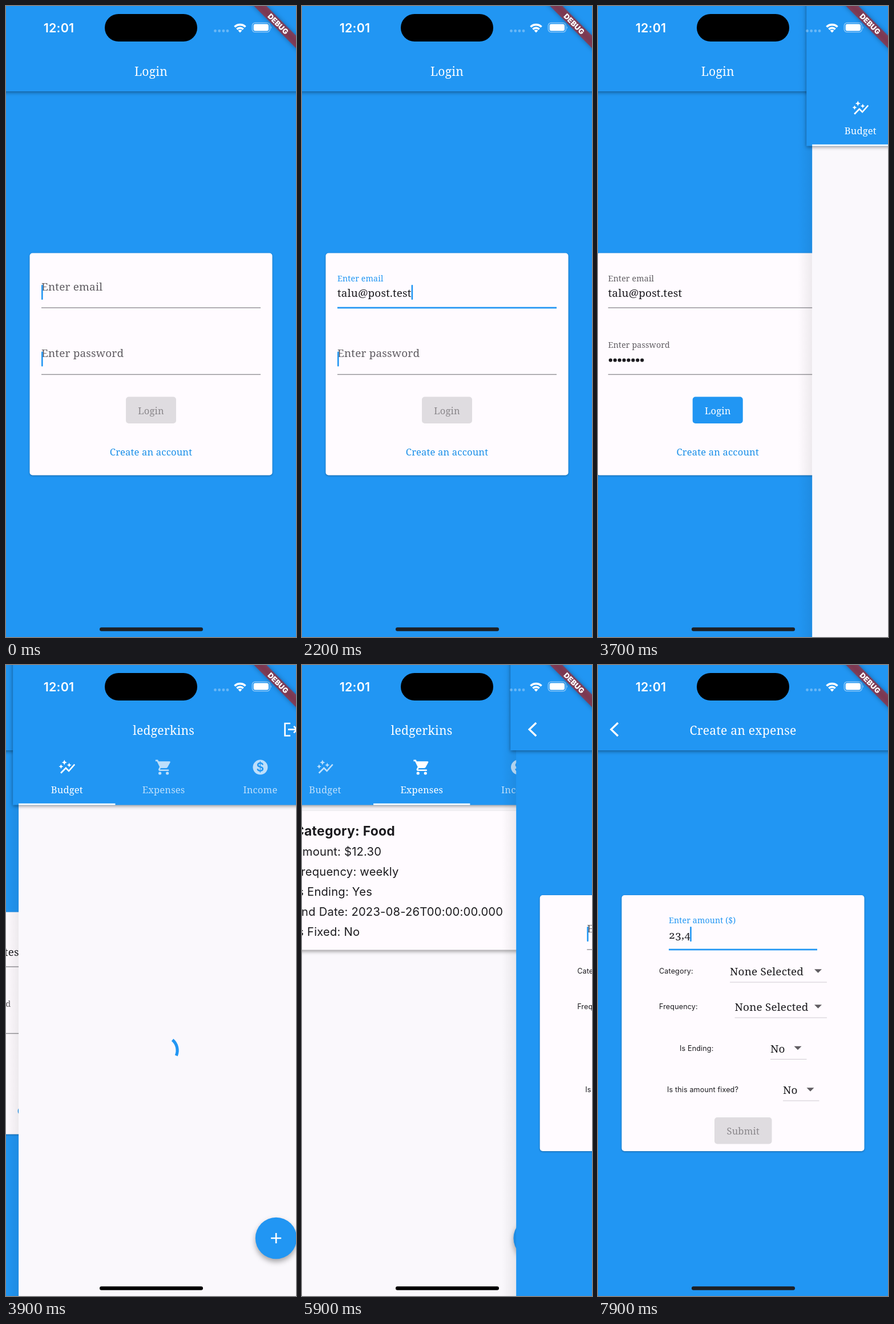
An HTML page for the animation above (8 s loop, 508 by 1102 pixels).

```html
<!DOCTYPE html>
<html lang="en">
<head>
<meta charset="utf-8">
<title>Budget app walkthrough</title>
<style>
  html, body { margin: 0; width: 100%; height: 100%; overflow: hidden; background: #2196f3; }
  svg { display: block; width: 508px; height: 1102px; }
  text { white-space: pre; }
  .serif { font-family: "Noto Serif", serif; font-variant-numeric: oldstyle-nums; letter-spacing: .01em; }
  .sans { font-family: Inter, sans-serif; letter-spacing: .01em; }
  .bar { filter: drop-shadow(0 2px 3px rgba(0,0,0,.4)); }
  .card { filter: drop-shadow(0 1.5px 1.5px rgba(0,0,0,.32)); }
  .raised { filter: drop-shadow(0 3px 3px rgba(0,0,0,.36)); }
  .fab { filter: drop-shadow(0 5px 5px rgba(0,0,0,.34)); }
  .banner { filter: drop-shadow(0 0 4px rgba(0,0,0,.5)); }
</style>
</head>
<body>
<svg viewBox="0 0 508 1102">
  <defs>
    <linearGradient id="edge" x1="1" x2="0">
      <stop offset="0" stop-opacity=".07"/><stop offset="1" stop-opacity="0"/>
    </linearGradient>
  </defs>
  <g id="stage"></g>
  <g id="system">
    <text class="sans" x="92.5" y="46" font-size="21.5" font-weight="600" fill="#fff" text-anchor="middle">12:01</text>
    <rect x="173" y="14" width="162" height="48" rx="24"/>
    <g fill="#fff" fill-opacity=".32">
      <circle cx="366.5" cy="43.5" r="2.4"/><circle cx="373.7" cy="43.5" r="2.4"/>
      <circle cx="380.9" cy="43.5" r="2.4"/><circle cx="388" cy="43.5" r="2.4"/>
    </g>
    <g fill="none" stroke="#fff" stroke-width="3.6">
      <path d="M400.5 36.5a13.5 13.5 0 0 1 19 0M404.4 40.6a8 8 0 0 1 11.2 0"/>
      <path d="M410 46.5l-3.4-3.6a4.8 4.8 0 0 1 6.8 0z" fill="#fff" stroke="none"/>
    </g>
    <rect x="431.3" y="29.3" width="31" height="16.4" rx="5" fill="none" stroke="#fff" stroke-opacity=".5" stroke-width="1.3"/>
    <rect x="433.6" y="31.6" width="26.4" height="11.8" rx="3.2" fill="#fff"/>
    <path d="M464 35q2 2.5 0 5z" fill="#fff" fill-opacity=".6"/>
    <rect id="home" x="164" y="1085.3" width="181" height="6.4" rx="3.2"/>
    <g transform="translate(508 0) rotate(45)">
      <rect class="banner" x="-60" y="36.5" width="120" height="15.6" fill="#b71c1c" fill-opacity=".627"/>
      <text class="sans" y="49" font-size="12.8" font-weight="900" fill="#fff" text-anchor="middle">DEBUG</text>
    </g>
  </g>
</svg>
<script>
const W = 508, H = 1102, LOOP = 8000, STEP = 100;
const BLUE = '#2196f3', PAPER = '#fffbff', INK = '#1c1b1f', GRAY = '#605d62', LINE = '#918f94', RED = '#ba1a1a';
const SERIF_SCALE = 0.91;
const EMAIL = 'talu@post.test';

const stage = document.getElementById('stage');
const home = document.getElementById('home');
const ruler = document.createElement('canvas').getContext('2d');

const clamp = v => Math.min(1, Math.max(0, v));
const lerp = (a, b, p) => a + (b - a) * p;
const progress = (t, start, length) => clamp((t - start) / length);
const mix = (a, b, p) => `color-mix(in srgb, ${b} ${p * 100}%, ${a})`;
const typedCount = (t, start, step) => Math.max(0, Math.floor((t - start) / step) + 1);

function bezier(x1, y1, x2, y2) {
  const at = (a, b, s) => 3 * (1 - s) ** 2 * s * a + 3 * (1 - s) * s * s * b + s ** 3;
  return x => {
    let lo = 0, hi = 1;
    for (let i = 0; i < 24; i++) {
      const mid = (lo + hi) / 2;
      if (at(x1, x2, mid) < x) lo = mid; else hi = mid;
    }
    return x >= 1 ? 1 : at(y1, y2, hi);
  };
}
const ease = bezier(.25, .1, .25, 1);
const fastOutSlowIn = bezier(.4, 0, .2, 1);
const pageCurve = bezier(.35, .91, .33, .97);

// Drawing helpers
const rect = (x, y, w, h, fill, extra = '') =>
  `<rect x="${x}" y="${y}" width="${w}" height="${h}" style="fill:${fill}" ${extra}/>`;
const group = (x, content, extra = '') => `<g transform="translate(${x} 0)" ${extra}>${content}</g>`;
const serif = (x, y, size, str, fill = INK, anchor = 'start') =>
  `<text class="serif" x="${x}" y="${y}" font-size="${size * SERIF_SCALE}" text-anchor="${anchor}" style="fill:${fill}">${str}</text>`;
const sans = (x, y, size, str, weight = 400) =>
  `<text class="sans" x="${x}" y="${y}" font-size="${size}" font-weight="${weight}" fill="${INK}">${str}</text>`;
const card = (x, y, w, h, cls = 'card') => rect(x, y, w, h, PAPER, `rx="5" class="${cls}"`);

function serifWidth(str, size) {
  const px = size * SERIF_SCALE;
  ruler.font = `${px}px "Noto Serif", serif`;
  return ruler.measureText(str).width + str.length * px * .01;
}

function button(x, y, w, str, enabled) {
  return rect(x, y, w, 46.5, enabled ? BLUE : '#dfdce0', 'rx="5"') +
    serif(x + w / 2, y + 30, 18.2, str, enabled ? '#fff' : '#8a878b', 'middle');
}

const titleBar = (str, height = 149) =>
  rect(-10, -10, W + 20, height + 10, BLUE, 'class="bar"') + serif(254, 122, 23.2, str, '#fff', 'middle');

// A Material text field; y is its underline.
function field({ x, y, w, label, value = '', dots = 0, float, focus, error = 0 }) {
  const accent = error ? RED : BLUE;
  const lit = error ? 1 : focus;
  const tint = mix(GRAY, accent, lit);
  const thick = lerp(1.4, 2.7, focus);
  let out = rect(x, y - thick / 2, w, thick, mix(LINE, accent, lit)) +
    serif(x, lerp(y - 30.5, y - 46.5, float), lerp(20.8, 15.6, float), label, tint);
  if (value) out += serif(x, y - 19, 20.8, value);
  for (let i = 0; i < dots; i++) out += `<circle cx="${x + 4.2 + i * 7.9}" cy="${y - 25}" r="3.1" fill="${INK}"/>`;
  if (focus > 0) {
    const end = dots ? dots * 7.9 : value ? serifWidth(value, 20.8) : 0;
    out += rect(x + end, y - 40, 2.6, 26, accent, 'rx="1"');
  }
  return out;
}

const errorText = (x, y, str, opacity) => `<g opacity="${opacity}">${serif(x, y, 15.6, str, RED)}</g>`;

// Pages
function loginPage(t) {
  const typed = t < 1400 ? Math.min(4, typedCount(t, 700, 150)) : 4 + typedCount(t, 1400, 60);
  const count = Math.min(EMAIL.length, typed);
  const dots = Math.min(8, typedCount(t, 2500, 120));
  const emailError = count > 0 && count < EMAIL.length - 1;
  const passError = dots > 0 && dots < 8;
  const emailFloat = fastOutSlowIn(progress(t, 420, 167));
  const passFloat = fastOutSlowIn(progress(t, 2250, 167));
  const passFocus = t < 3500 ? passFloat : 0;
  const growth = emailError || passError ? 28 : 0;
  const top = 431.5 - growth / 2;
  const passTop = top + (emailError ? 28 : 0);

  return rect(0, 0, W, H, BLUE) + titleBar('Login') + card(41.5, top, 425, 388 + growth) +
    field({ x: 62, y: top + 95.5, w: 384, label: 'Enter email', value: EMAIL.slice(0, count),
      float: emailFloat, focus: t < 2250 ? emailFloat : 0, error: emailError }) +
    (emailError ? errorText(62, top + 120.5, 'invalid username', progress(t, 680, 167)) : '') +
    field({ x: 62, y: passTop + 212, w: 384, label: 'Enter password', dots,
      float: passFloat, focus: passFocus, error: passError }) +
    (passError ? errorText(62, top + 237, 'invalid password', progress(t, 2480, 167)) : '') +
    button(210, top + growth + 251, 88, 'Login', dots >= 8) +
    serif(254, top + growth + 353.5, 18.2, 'Create an account', '#1a8fe8', 'middle');
}

function spinner(cx, cy, ms) {
  const phase = ms / 1333 % 1;
  const head = fastOutSlowIn(clamp(phase * 2)) * 1.5 * Math.PI;
  const tail = fastOutSlowIn(clamp(phase * 2 - 1)) * 1.5 * Math.PI;
  const start = -Math.PI / 2 + tail + ms / 2222 * 2 * Math.PI + phase * Math.PI / 2;
  const sweep = Math.max(head - tail, .001);
  const point = a => `${cx + 24 * Math.cos(a)} ${cy + 24 * Math.sin(a)}`;
  return `<path d="M${point(start)}A24 24 0 ${+(sweep > Math.PI)} 1 ${point(start + sweep)}" fill="none" stroke="${BLUE}" stroke-width="5.2"/>`;
}

const icons = [
  `<path d="M14.06 9.94L12 9l2.06-.94L15 6l.94 2.06L18 9l-2.06.94L15 12zM4 14l.94-2.06L7 11l-2.06-.94L4 8l-.94 2.06L1 11l2.06.94zM8.5 9l1.09-2.41L12 5.5 9.59 4.41 8.5 2 7.41 4.41 5 5.5l2.41 1.09zM4.5 20.5l6-6.01 4 4L23 8.93l-1.41-1.41-7.09 7.97-4-4L3 19z"/>`,
  `<circle cx="7" cy="20" r="2"/><circle cx="17" cy="20" r="2"/><path d="M1 2v2h2l3.6 7.59-1.35 2.45C4.5 15.4 5.5 17 7 17h12v-2H7.42c-.2 0-.3-.2-.22-.37l.9-1.63h7.45c.75 0 1.41-.41 1.75-1.03l3.58-6.49C21.2 4.8 20.8 4 20 4H5.21l-.94-2z"/>`,
  `<circle cx="12" cy="12" r="10"/><text class="sans" x="12" y="17.6" font-size="16" font-weight="600" text-anchor="middle" fill="${BLUE}">$</text>`
];

function tab(i, str, active) {
  const cx = W / 6 * (2 * i + 1);
  return `<g fill="#fff" opacity="${lerp(.7, 1, active)}">
    <g transform="translate(${cx - 15.6} 163) scale(1.3)">${icons[i]}</g>
    ${serif(cx, 224, 18.2, str, '#fff', 'middle')}</g>`;
}

function dashboardPage(t) {
  const slide = ease(progress(t, 4850, 300));
  const ink = progress(t, 4740, 80) * (1 - progress(t, 5020, 200));
  const lines = ['Amount: $12.30', 'Frequency: weekly', 'Is Ending: Yes',
    'End Date: 2023-08-26T00:00:00.000', 'Is Fixed: No'];
  const expense = card(10, 255, 488, 242.5, 'raised') + sans(31, 298, 23, 'Category: Food', 700) +
    lines.map((str, i) => sans(31, 332.5 + i * 35, 20.2, str)).join('');

  return rect(0, 0, W, H, '#faf8fc') +
    group(-W * slide, (t < 4500 ? spinner(254, 673, t - 3725) : '') + group(W, expense)) +
    titleBar('ledgerkins', 244.5) +
    '<path d="M476 102H466.5V123.500H476M472 112.700H487M482 107l5.700 5.700-5.700 5.700" fill="none" stroke="#fff" stroke-width="2.7"/>' +
    rect(W / 3, 149, W / 3, 95.5, `rgba(120,160,200,${.24 * ink})`) +
    tab(0, 'Budget', 1 - slide) + tab(1, 'Expenses', slide) + tab(2, 'Income', 0) +
    rect(W / 3 * slide, 241.800, W / 3, 2.7, '#fff') +
    `<circle class="fab" cx="451" cy="1001" r="36.300" fill="${BLUE}"/>` +
    '<path d="M442 1001h18M451 992v18" stroke="#fff" stroke-width="2.6"/>';
}

// One labelled dropdown; y is the middle of the row.
function dropdown(labelX, label, x, right, y, value) {
  const arrow = right - 15.5;
  return sans(labelX, y + 4.5, 12.6, label) + serif(x, y + 7.500, 20.8, value) +
    `<path d="M${arrow - 6.500} ${y - 3.200}h13l-6.500 6.500z" fill="#605d62"/>` +
    rect(x, y + 19, right - x, 1, '#cfccd1');
}

function expensePage(t) {
  const focus = fastOutSlowIn(progress(t, 6490, 167));
  const value = '23,4'.slice(0, typedCount(t, 6900, 250));
  return rect(0, 0, W, H, BLUE) + titleBar('Create an expense') +
    '<path d="M35 101L23 112.500 35 124" fill="none" stroke="#fff" stroke-width="3.300"/>' +
    card(41.5, 402, 425, 447) +
    field({ x: 124, y: 497, w: 260, label: 'Enter amount ($)', value, float: focus, focus }) +
    dropdown(107, 'Category:', 231, 401, 534.5, 'None Selected') +
    dropdown(107, 'Frequency:', 239.5, 401, 596.5, 'None Selected') +
    dropdown(143, 'Is Ending:', 302, 365.5, 669, 'No') +
    dropdown(121, 'Is this amount fixed?', 324, 387.5, 741.5, 'No') +
    button(204, 790, 100.5, 'Submit', false);
}

// The new page slides in while the old one recedes by a third.
function push(oldPage, newPage, p) {
  const x = W * (1 - p);
  return group(-W / 3 * p, oldPage) +
    (p < 1 ? rect(x - 25, 0, 25, H, 'url(#edge)') : '') + group(x, newPage);
}

function render(t) {
  const toDashboard = pageCurve(progress(t, 3660, 400));
  const toExpense = pageCurve(progress(t, 5860, 400));
  if (t <= 3660) stage.innerHTML = loginPage(t);
  else if (t <= 5860) stage.innerHTML = push(toDashboard < 1 ? loginPage(t) : '', dashboardPage(t), toDashboard);
  else stage.innerHTML = push(toExpense < 1 ? dashboardPage(t) : '', expensePage(t), toExpense);
  home.setAttribute('fill', toDashboard > .5 && toExpense < .5 ? '#000' : '#1c1f24');
}

const begin = performance.now();
function tick() {
  const t = (performance.now() - begin) % LOOP;
  render(Math.floor(t / STEP) * STEP);
  requestAnimationFrame(tick);
}
tick();
</script>
</body>
</html>
```
